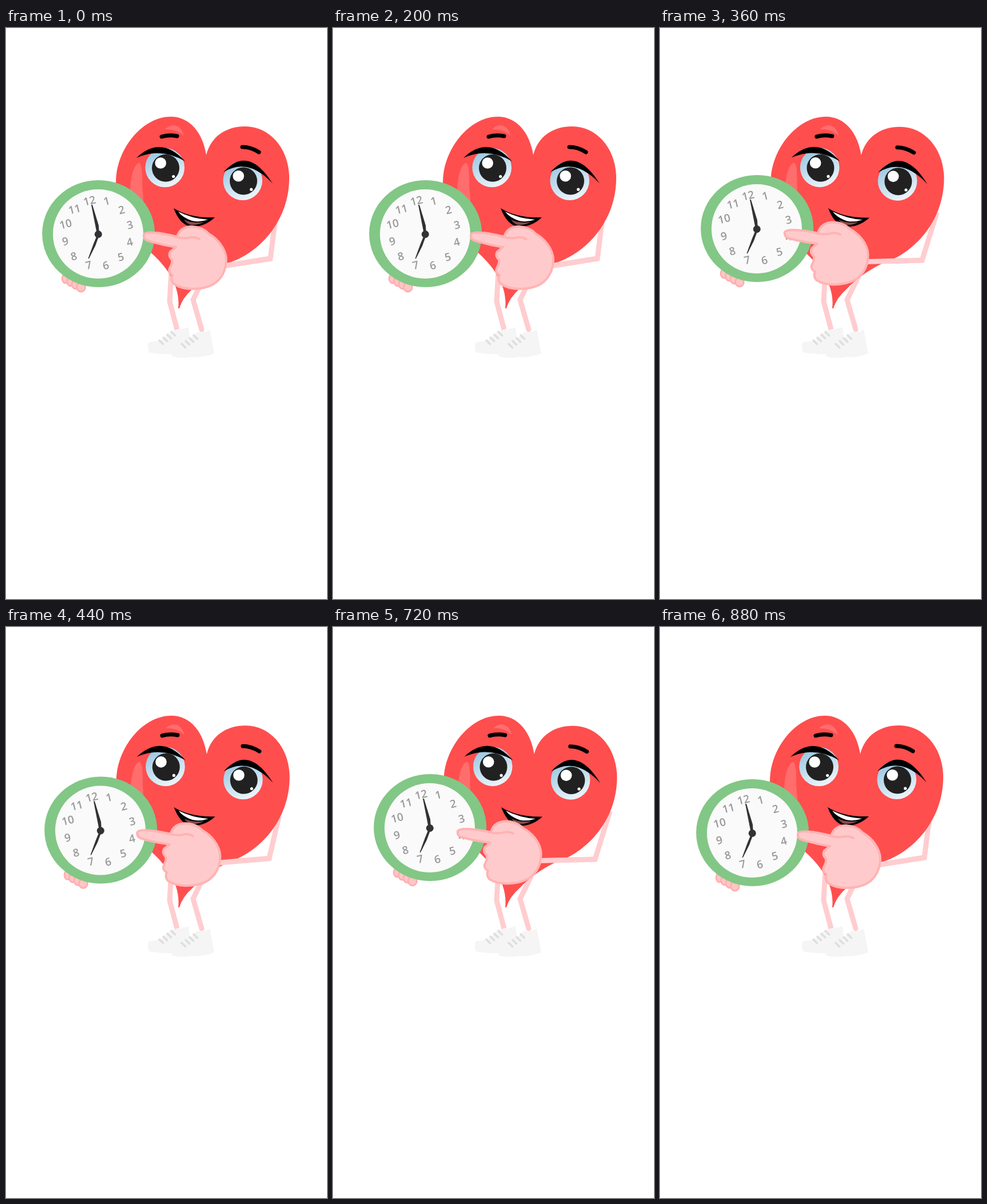
Recreate the animation shown at these times as an HTML page. Size 561 px wide and 998 px high, loop 1.2 s.

```html
<!DOCTYPE html>
<html lang="en">
<head>
<meta charset="utf-8">
<title>Heart with a clock</title>
<style>
  html, body { margin: 0; height: 100%; overflow: hidden; background: #fff; }
  svg { display: block; width: 100%; height: 100%; }
  .skin { fill: #ffcacb; stroke: #ffb3b4; stroke-width: 4; stroke-linejoin: round; }
  .limb { fill: none; stroke: #ffcdcf; stroke-width: 9; }
  .brow { fill: none; stroke: #000; stroke-width: 7; stroke-linecap: round; }
  .shoe { fill: #f5f5f5; }
  #laces { stroke: #dedede; stroke-width: 3.5; stroke-linecap: round; }
  #fingers { fill: #ffc6c6; stroke: #ffadae; stroke-width: 2.5; }
  #numerals { font: 600 19px "Open Sans", "Noto Sans", sans-serif; fill: #999; text-anchor: middle; }
</style>
</head>
<body>
<svg viewBox="0 0 561 998">
  <defs>
    <linearGradient id="sclera" x1="0.1" y1="0.1" x2="0.5" y2="1">
      <stop offset="0.1" stop-color="#a0cae3"/>
      <stop offset="1" stop-color="#e9f3f9"/>
    </linearGradient>
    <g id="eye">
      <circle r="34.3" fill="url(#sclera)"/>
      <circle cx="1.3" cy="0.8" r="24" fill="#212121"/>
      <circle cx="-7.5" cy="-8" r="9.8" fill="#fff"/>
      <circle cx="15" cy="15.5" r="2.6" fill="#fff"/>
    </g>
  </defs>

  <path class="limb" d="M289 425L286 478L299 527"/>
  <path class="limb" stroke-linecap="round" d="M346 436L327 475L342 527"/>
  <path class="shoe" d="M250 549Q266 548 275 543Q286 527 303 527L319 523L322 548L300 570Q270 571 250 567Q246 556 250 549Z"/>
  <path class="shoe" d="M291 553Q312 556 318 549Q326 536 335 531Q345 534 356 527L364 569Q340 577 325 575Q305 579 290 574Z"/>
  <g id="laces"></g>

  <path id="arm" class="limb"/>
  <g id="heart">
    <path fill="#ff4e4e" d="M350 222C344 184 322 155 288 155C238 155 192 212 192 270C192 326 222 365 248 388C274 410 306 446 301 490H303Q308 472 326 456Q350 430 388 411C442 394 495 338 495 262C495 212 462 172 418 172C384 172 358 190 350 222Z"/>
    <path fill="#ff6d6d" d="M217 295C216 262 224 236 233 236Q239 240 238 275L241 310ZM278 177C288 167 305 166 311 189Q298 176 278 177Z"/>
    <path class="brow" d="M272 190Q285 186 299 189M413 208Q428 208 442 217"/>
    <g id="eyes"></g>
    <path d="M293 315C312 327 338 332 365 331Q346 349 321 347Q303 342 293 315Z"/>
    <path fill="#fff" d="M301 321Q325 333 353 335Q338 340 325 337Q308 331 301 321Z"/>
    <path fill="#8a4a4a" d="M311 335Q325 342 346 339Q336 345 322 344Q315 341 311 335Z"/>
  </g>
  <path id="forearm" class="limb"/>

  <g id="clock">
    <g id="fingers"></g>
    <ellipse cx="161.7" cy="359.5" rx="98.5" ry="93.5" fill="#82c785"/>
    <ellipse cx="161" cy="360" rx="79" ry="78" fill="#fafafa"/>
    <g id="numerals"></g>
    <g fill="#303234">
      <path d="M149 309H151L162 345L163 360H159Z"/>
      <path d="M143.5 403L153 377L160 360L163 362L156 381L145 403Z"/>
      <circle cx="161.3" cy="360.5" r="6.5"/>
    </g>
  </g>

  <g id="hand">
    <path class="skin" d="M241 361Q243 355 271 359Q288 362 299 365C303 352 313 347 325 347Q344 348 355 360C369 368 385 386 385 406C384 430 371 449 346 454Q312 460 293 447Q287 440 291 432Q282 426 287 418Q291 411 290 405Q283 398 287 391L297 383Q270 379 246 371Q240 368 241 361Z"/>
    <path fill="none" stroke="#ffb3b4" stroke-width="4" stroke-linecap="round" d="M296 365Q308 368 318 367Q329 364 338 369"/>
  </g>
</svg>
<script>
const $ = id => document.getElementById(id);
const LOOP = 1200, STEP = 40;

const mix = (a, b, k) => a + (b - a) * k;
const mixAll = (a, b, k) => a.map((v, i) => mix(v, b[i], k));
const repeat = (n, part) => Array.from({ length: n }, (_, i) => part(i)).join('');
// Linear rise and fall around a peak
const pulse = (t, peak, half) => Math.max(0, 1 - Math.abs(t - peak) / half);

// Lash as [x0, y0, x1, y1, height of its middle], open and shut
const eyes = [
  { x: 277.7, y: 244, open: [228, 227, 313, 233, 213.5], shut: [222, 250, 307, 272, 280] },
  { x: 413.7, y: 266.7, open: [380, 252, 466, 272, 238], shut: [373, 273, 461, 292, 300.5] }
];

const laces = (x, y) => repeat(4, i => `<path d="M${x + 7 * i} ${y - 5 * i}l6.5 6.5"/>`);
$('laces').innerHTML = laces(268, 546) + laces(307, 552);

$('fingers').innerHTML = repeat(4, i =>
  `<ellipse cx="${104 + 9 * i}" cy="${438 + 5 * i}" rx="${6 + i / 2}" ry="8"/>`);

$('numerals').innerHTML = repeat(12, i => {
  const a = (i * 30 + 15.8) * Math.PI / 180;
  const x = 160.1 + 58.2 * Math.sin(a), y = 358.3 - 58.2 * Math.cos(a);
  return `<text transform="translate(${x} ${y}) rotate(-14)" y="6.8">${i + 1}</text>`;
});

// Crescent between two corners
function lash([x0, y0, x1, y1, mid]) {
  const cx = (x0 + x1) / 2, cy = 2 * mid - (y0 + y1) / 2;
  return `<path d="M${x0} ${y0}Q${cx} ${cy - 11} ${x1} ${y1}Q${cx} ${cy + 11} ${x0} ${y0}Z"/>`;
}

function blink(k) {
  $('eyes').innerHTML = eyes.map(({ x, y, open, shut }) =>
    `<use href="#eye" x="${x}" y="${y}"/>
     <circle cx="${x - 2}" cy="${y + 2.5}" r="37.5" fill="#861616"
       style="clip-path: inset(0 0 ${100 * (1 - k)}% 0)"/>` +
    lash(mixAll(open, shut, k))).join('');
}

function pose(p) {
  const move = (id, value) => $(id).setAttribute('transform', value);
  move('heart', `rotate(${0.35 * p} 302 490)`);
  move('clock', `translate(${8 * p} ${-9 * p})`);
  move('hand', `translate(${-21.5 * p} ${-7.5 * p}) rotate(${-2.5 * p} 325 400)`);
  const shoulder = mixAll([470, 340], [484, 322], p);
  const elbow = mixAll([462, 403], [458, 406], p);
  const wrist = mixAll([380, 416], [358, 408.5], p);
  $('arm').setAttribute('d', `M${shoulder}L${elbow}L${wrist}`);
  $('forearm').setAttribute('d', `M${elbow}L${wrist}`);
}

function draw() {
  const t = Math.floor(performance.now() % LOOP / STEP) * STEP;
  blink(pulse(t, 120, 80));
  pose(pulse(t, 360, 160) + pulse(t, 720, 160));
  requestAnimationFrame(draw);
}
draw();
</script>
</body>
</html>
```
